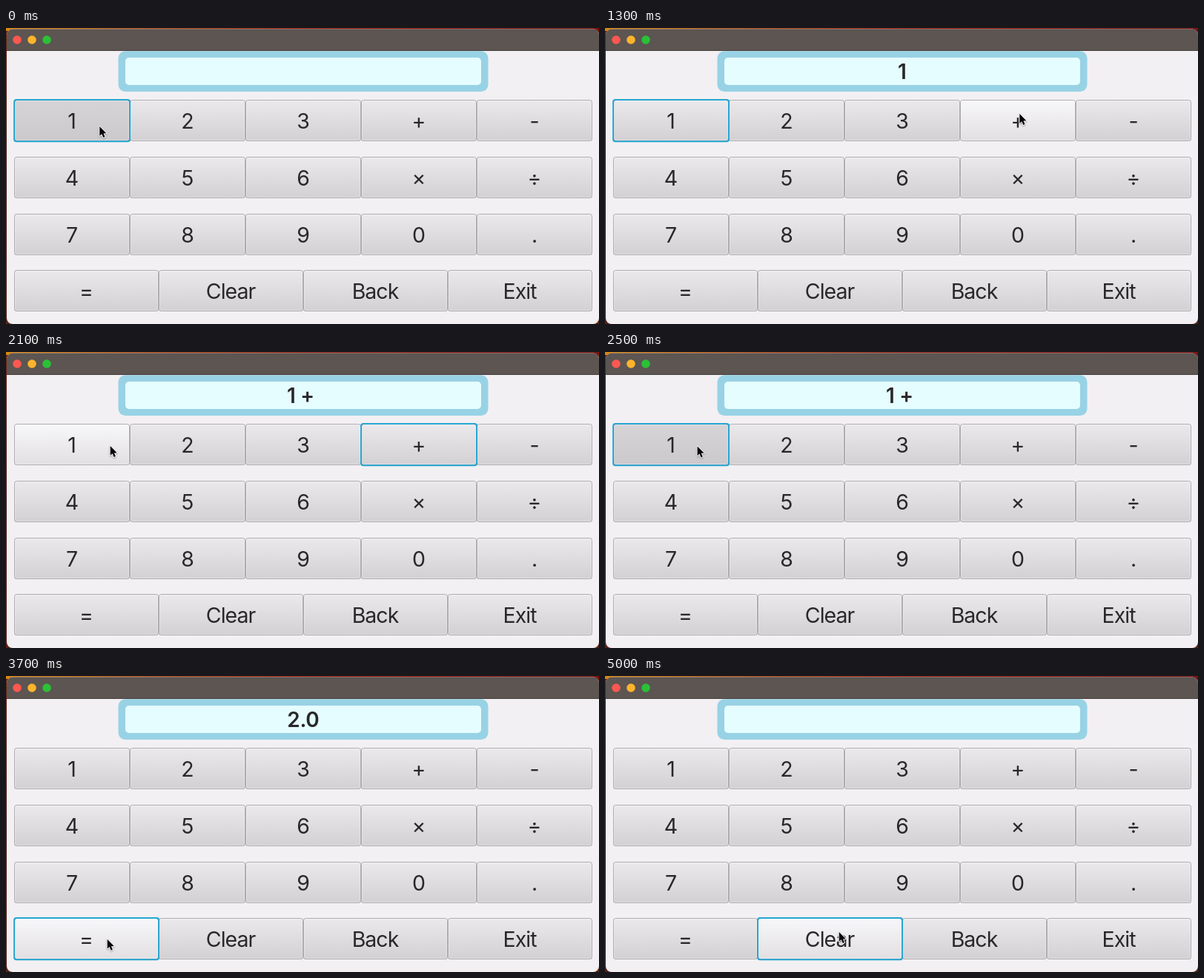
Write an HTML page with a canvas that moves like this. It is 800 by 400 pixels and loops after 5.1 s.

```html
<!DOCTYPE html>
<html lang="en">
<head>
<meta charset="utf-8">
<title>Calculator</title>
<style>
html, body { margin: 0; width: 100%; height: 100%; overflow: hidden; background: #f2f0f3; }
canvas { display: block; width: 100%; height: 100%; }
</style>
</head>
<body>
<canvas id="stage" width="800" height="400"></canvas>
<script>
const ctx = document.getElementById('stage').getContext('2d');
const LOOP = 5100, STEP = 100, MOVE = 300;
const FONT = 'Inter, "Open Sans", sans-serif';
const INK = '#29272a';

const rows = ['1 2 3 + -', '4 5 6 × ÷', '7 8 9 0 .', '= Clear Back Exit'].map(r => r.split(' '));
const buttons = rows.flatMap((labels, r) => labels.map((label, c) => {
  const w = 780 / labels.length;
  return { label, x: 11 + c * w, y: Math.round(97 + r * 76.8), w, h: 56 };
}));

// Each visit: the pointer glides to x, y, presses the button, and the display changes on release
const visits = [
  { label: '1', x: 126.3, y: 133, leave: -MOVE, press: 0, release: 100, shows: '1', sag: 0 },
  { label: '+', x: 559.3, y: 116, leave: 500, press: 1600, release: 1800, shows: '1 + ', sag: 50 },
  { label: '1', x: 124.6, y: 127.4, leave: 1900, press: 2400, release: 2600, shows: '1 + 1', sag: 0 },
  { label: '=', x: 136.7, y: 355.8, leave: 2800, press: 3500, release: 3700, shows: '2.0', sag: 0 },
  { label: 'Clear', x: 315.8, y: 346, leave: 3900, press: 5000, release: 5000, shows: '', sag: 0 }
];

const shades = {
  normal: ['#ebe9ec', '#d2d0d3'],
  hover: ['#f8f7f9', '#e1dfe2'],
  pressed: ['#d6d4d7', '#cbc9cc']
};

const lastVisit = (event, t) => visits.findLastIndex(v => v[event] <= t);
const easeOut = k => 1 - (1 - k) ** 3;

function pointerAt(t) {
  const i = lastVisit('leave', t);
  const to = visits[i], from = visits[Math.max(0, i - 1)];
  const k = Math.min(1, (t - to.leave) / MOVE), e = easeOut(k);
  return [
    from.x + (to.x - from.x) * e,
    from.y + (to.y - from.y) * e + to.sag * 4 * k * (1 - k)
  ];
}

function box(x, y, w, h, r, fill) {
  ctx.beginPath();
  ctx.roundRect(x, y, w, h, r);
  ctx.fillStyle = fill;
  ctx.fill();
}

function outline(x, y, w, h, r, color, width) {
  ctx.beginPath();
  ctx.roundRect(x, y, w, h, r);
  ctx.strokeStyle = color;
  ctx.lineWidth = width;
  ctx.stroke();
}

function gradient(x1, y0, y1, colors) {
  const g = ctx.createLinearGradient(0, y0, x1, y1);
  colors.forEach((c, i) => g.addColorStop(i / (colors.length - 1), c));
  return g;
}

// Centred text; the trailing letter gap is taken out of the centring
function text(label, x, y, weight, size, gap) {
  ctx.font = `${weight} ${size}px ${FONT}`;
  ctx.letterSpacing = gap + 'px';
  ctx.textAlign = 'center';
  ctx.fillStyle = INK;
  ctx.fillText(label, x + gap / 2, y);
}

function drawWindow() {
  ctx.fillStyle = gradient(800, 0, 0, ['#d9880f', '#b04a18', '#962415', '#8c1a11', '#7c1410']);
  ctx.fillRect(0, 0, 800, 30);
  ctx.fillStyle = gradient(0, 4, 400, ['#6b2415', '#4a2019', '#5a2418']);
  ctx.fillRect(0, 4, 800, 396);
  box(1, 1.6, 799, 398.4, 8, '#f2f0f3');
  box(1, 1.6, 799, 29.4, [8, 8, 0, 0], '#5c5552');
  ctx.fillStyle = '#49423f';
  ctx.fillRect(1, 30, 799, 1);
  ['#fc5850', '#fdb42c', '#2ac136'].forEach((color, i) => box(9.2 + i * 20, 10.2, 11.6, 11.6, 5.8, color));
}

function drawDisplay(value) {
  box(151.5, 31.3, 499, 54.7, 9.5, '#98d2e5');
  box(161, 40, 480, 37, 5, '#e6fdff');
  text(value, 401, 69, 600, 28, -0.3);
}

function drawButton({ label, x, y, w, h }, state) {
  box(x, y, w, h, 3, gradient(0, y, y + h, shades[state]));
  outline(x + 1.5, y + 1.5, w - 3, h - 3, 2, 'rgba(255,255,255,0.3)', 1);
  outline(x + 0.5, y + 0.5, w - 1, h - 1, 3, '#aeacaf', 1);
  text(label, x + w / 2, y + 38.5, 400, 28.5, -1);
}

function drawPointer(x, y) {
  ctx.save();
  ctx.translate(x, y);
  ctx.beginPath();
  [[0, 0], [0, 12.8], [2.9, 10.2], [5, 15], [7.2, 14], [5.2, 9.4], [9, 9.2]]
    .forEach(([px, py]) => ctx.lineTo(px, py));
  ctx.closePath();
  ctx.lineJoin = 'round';
  ctx.lineWidth = 2;
  ctx.strokeStyle = '#f7f6f8';
  ctx.shadowColor = 'rgba(0,0,0,0.3)';
  ctx.shadowBlur = 2;
  ctx.shadowOffsetY = 1;
  ctx.stroke();
  ctx.shadowColor = 'transparent';
  ctx.fillStyle = '#050505';
  ctx.fill();
  ctx.restore();
}

function draw(t) {
  const { label, release } = visits[lastVisit('press', t)];
  // Hover reacts slightly ahead of the visible pointer
  const [hx, hy] = pointerAt(t + STEP);
  const isOver = b => hx >= b.x && hx < b.x + b.w && hy >= b.y && hy < b.y + b.h;

  drawWindow();
  drawDisplay(visits[lastVisit('release', t)]?.shows ?? '');
  for (const b of buttons) {
    const down = b.label === label && t < release;
    drawButton(b, down ? 'pressed' : isOver(b) ? 'hover' : 'normal');
  }
  const f = buttons.find(b => b.label === label);
  outline(f.x + 0.1, f.y + 0.1, f.w, f.h + 0.2, 3, '#25a5d0', 2);
  drawPointer(...pointerAt(t));
}

function tick() {
  const t = performance.now() % LOOP;
  draw(Math.floor(t / STEP) * STEP);
  requestAnimationFrame(tick);
}
tick();
</script>
</body>
</html>
```
